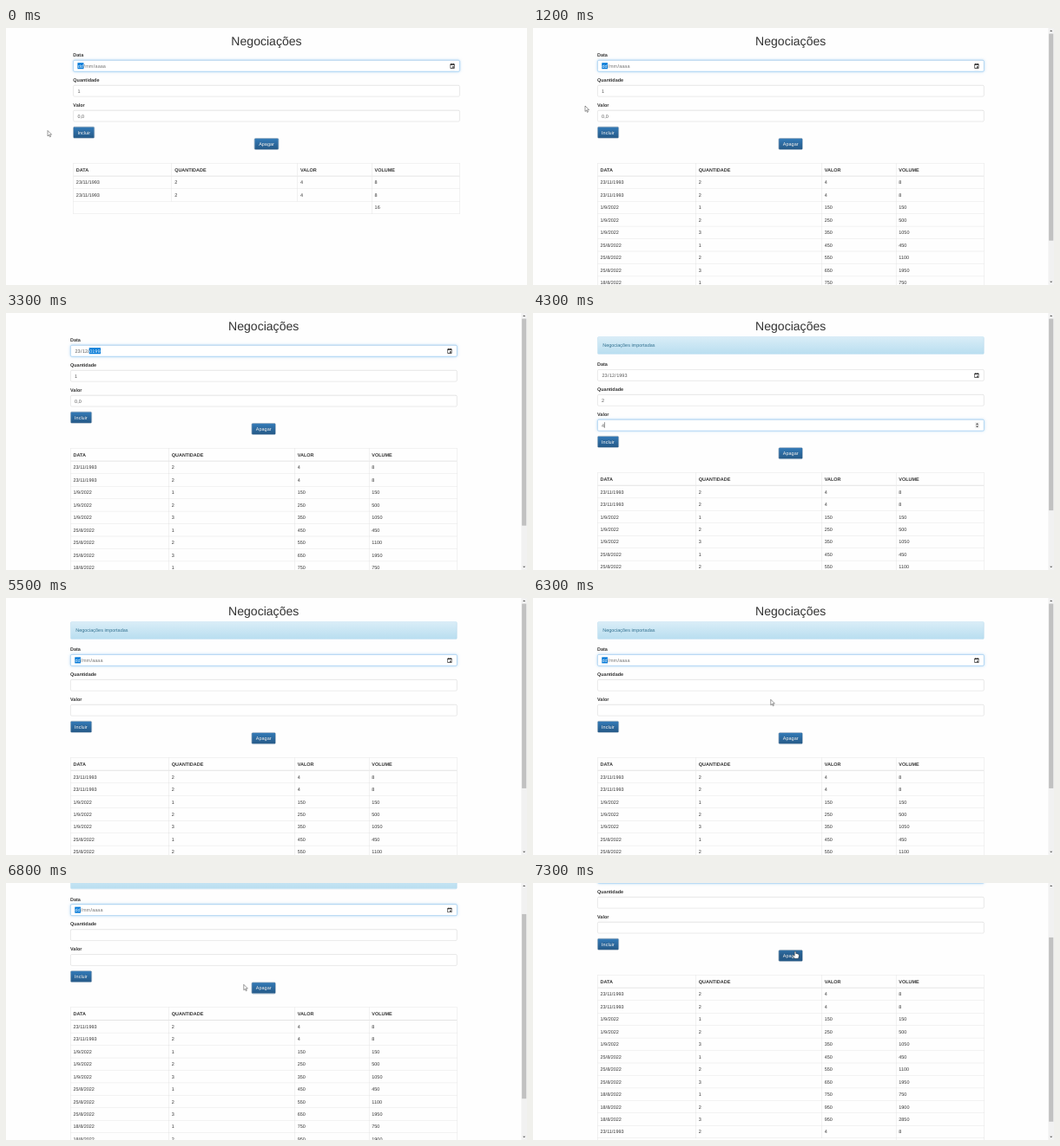
Recreate the animation shown at these times as an HTML page. Size 600 by 297 pixels, loop 7.4 s.

```html
<!DOCTYPE html>
<html lang="pt-BR">
<head>
<meta charset="utf-8">
<title>Negociações</title>
<style>
* { box-sizing: border-box; }
html, body { margin: 0; width: 600px; height: 297px; overflow: hidden; background: #fefefe; }
#stage {
  position: absolute; left: 0; top: 0; width: 1536px; height: 760.32px; overflow: hidden;
  transform: scale(.390625); transform-origin: 0 0; text-rendering: geometricPrecision;
  font: 14px/20px "Liberation Sans", Arial, sans-serif; color: #333;
}
#page { display: flow-root; }
.container { width: 1170px; margin: 0 auto; padding: 0 15px; }
h1 { margin: 20px 0 10px; font-size: 36px; line-height: 39.6px; font-weight: 400; text-align: center; }
.alert {
  height: 52px; margin-bottom: 20px; padding: 15px; border: 1px solid #9acfea; border-radius: 4px;
  color: #31708f; background: linear-gradient(#d9edf7, #b9def0);
  box-shadow: inset 0 1px 0 rgba(255,255,255,.25), 0 1px 2px rgba(0,0,0,.05);
}
.label { height: 20px; margin-bottom: 5px; font-weight: 700; }
.input {
  position: relative; height: 34px; margin-bottom: 15px; padding: 6px 12px; white-space: nowrap;
  border: 1px solid #ccc; border-radius: 4px; background: #fff; color: #555;
  box-shadow: inset 0 1px 1px rgba(0,0,0,.075);
}
.input.focus { border-color: #66afe9; box-shadow: inset 0 1px 1px rgba(0,0,0,.075), 0 0 8px rgba(102,175,233,.6); }
.input svg { position: absolute; }
.part { display: inline-block; line-height: 18px; padding: 0 1px; }
.empty { color: #757575; }
.sel { background: #0078d7; color: #fff; }
.caret { display: inline-block; width: 1px; height: 17px; margin-right: -1px; background: #000; vertical-align: -3px; }
.btn {
  width: max-content; height: 34px; padding: 6px 12px; border: 1px solid #245580; border-radius: 4px;
  color: #fff; text-shadow: 0 -1px 0 rgba(0,0,0,.2); background: linear-gradient(#337ab7, #265a88);
  box-shadow: inset 0 1px 0 rgba(255,255,255,.15), 0 1px 1px rgba(0,0,0,.075);
}
.btn.on { background: linear-gradient(#2d6ca2, #265a88 55%); border-color: #204d74; }
#clear { margin: 0 auto; }
table { width: 1140px; margin: 40px 0 20px; table-layout: fixed; border-collapse: collapse; border: 1px solid #ddd; }
th, td { height: 37px; padding: 8px; border: 1px solid #ddd; text-align: left; }
th { border-bottom-width: 2px; }
#bar { position: absolute; right: 0; top: 0; width: 17px; height: 100%; background: #f1f1f1; }
#thumb { position: absolute; left: 2px; width: 13px; background: #c1c1c1; }
#bar svg { position: absolute; left: 0; fill: #505050; }
#pointer { position: absolute; left: 0; top: 0; overflow: visible; fill: #fff; stroke: #000; stroke-linejoin: round; }
[hidden] { display: none !important; }
</style>
</head>
<body>
<div id="stage">
  <div id="page"><div class="container">
    <h1>Negociações</h1>
    <div class="alert" id="msg">Negociações importadas</div>
    <div class="label">Data</div>
    <div class="input" id="date"><span id="dateText"></span>
      <svg style="right:14px;top:9px" width="14" height="15" viewBox="0 0 14 15">
        <path d="M1 2H13V14H1ZM1 3.5H13M4 0V3M10 0V3" fill="none" stroke="#000" stroke-width="1.8"/>
        <path d="M7.5 8.5H11V12H7.5Z"/>
      </svg>
    </div>
    <div class="label">Quantidade</div>
    <div class="input" id="qty"></div>
    <div class="label">Valor</div>
    <div class="input"><span id="val"></span>
      <svg id="spin" style="right:12px;top:6px" width="15" height="20" viewBox="0 0 15 20">
        <path d="M0 0H15V20H0Z" fill="#efefef"/>
        <path d="M3.5 8L7.5 3.5L11.5 8ZM3.5 12L7.5 16.5L11.5 12Z" fill="#444"/>
      </svg>
    </div>
    <div class="btn" id="add">Incluir</div>
    <div class="btn" id="clear">Apagar</div>
    <table>
      <colgroup><col style="width:290px"><col style="width:371px"><col style="width:219px"><col></colgroup>
      <thead><tr><th>DATA</th><th>QUANTIDADE</th><th>VALOR</th><th>VOLUME</th></tr></thead>
      <tbody id="rows"></tbody>
      <tfoot><tr><td colspan="3"></td><td id="total"></td></tr></tfoot>
    </table>
  </div></div>
  <div id="bar">
    <svg style="top:0" width="17" height="17"><path d="M4.5 10.5L8.5 6.5L12.5 10.5Z"/></svg>
    <div id="thumb"></div>
    <svg style="bottom:0" width="17" height="17"><path d="M4.5 6.5L8.5 10.5L12.5 6.5Z"/></svg>
  </div>
  <svg id="pointer" width="1" height="1">
    <path id="arrow" d="M0 0V16.5L3.8 13L6.4 19L9 17.9L6.4 12H11.7Z"/>
    <path id="hand" d="M-2 1.5Q0 -1 2 1.5V7Q4 5.5 5.5 7.5Q7.5 6.5 8.5 8.5Q11 8 11 10.5V15L9 21H-2L-7 14Q-8 10.5 -5 11L-2 14Z"/>
  </svg>
</div>
<script>
const LOOP = 7400, STEP = 100, SCALE = .390625, VIEW = 760.32, ARROW = 17;
const $ = id => document.getElementById(id);

const deals = [
  ['23/11/1993', 2, 4], ['23/11/1993', 2, 4],
  ['1/9/2022', 1, 150], ['1/9/2022', 2, 250], ['1/9/2022', 3, 350],
  ['25/8/2022', 1, 450], ['25/8/2022', 2, 550], ['25/8/2022', 3, 650],
  ['18/8/2022', 1, 750], ['18/8/2022', 2, 950], ['18/8/2022', 3, 950],
  ['23/11/1993', 2, 4]
];
const rows = deals.map(([day, n, price]) => {
  const tr = $('rows').insertRow();
  [day, n, price, n * price].forEach(v => tr.insertCell().textContent = v);
  return tr;
});

// Event times in ms
const IMPORT = 1200, TYPE = 2000, TO_QTY = 3700, TO_VAL = 4000, NOTICE = 4200, TO_ADD = 4500, SUBMIT = 5000;

const dayKeys = [[0, 'dd'], [TYPE, '02'], [2200, '23'], [SUBMIT, 'dd']];
const monthKeys = [[0, 'mm'], [2400, '01'], [2600, '12'], [SUBMIT, 'mm']];
const yearKeys = [[0, 'aaaa'], [2900, '0001'], [3100, '0019'], [3300, '0199'], [3500, '1993'], [SUBMIT, 'aaaa']];
const partKeys = [[0, 0], [2200, 1], [2600, 2], [TO_QTY, -1], [SUBMIT, 0]];
const focusKeys = [[0, 'date'], [TO_QTY, 'qty'], [TO_VAL, 'val'], [TO_ADD, 'add'], [SUBMIT, 'date']];
const qtyKeys = [[0, '1'], [3900, '2'], [SUBMIT, '']];
const valKeys = [[0, '0,0'], [4200, '4'], [SUBMIT, '']];
const path = [
  [100, 48, 118.5], [400, 60, 90], [5700, 130, 100], [6300, 273.8, 117.3],
  [6900, 273.8, 117.3], [7300, 302, 79]
];

const at = (keys, t) => keys.filter(k => k[0] <= t).pop()[1];
const ease = (t, a, b) => {
  const u = Math.min(1, Math.max(0, (t - a) / (b - a)));
  return u * u * (3 - 2 * u);
};

function pointerAt(t) {
  const i = path.findIndex(p => p[0] > t);
  if (i === 0) return path[0].slice(1);
  if (i < 0) return path[path.length - 1].slice(1);
  const [a, x, y] = path[i - 1], [b, x2, y2] = path[i];
  if (a === 400) return [x, y];
  const u = ease(t, a, b);
  return [x + (x2 - x) * u, y + (y2 - y) * u];
}

function dateHtml(t) {
  const active = at(partKeys, t);
  return [dayKeys, monthKeys, yearKeys].map((keys, i) => {
    const text = at(keys, t);
    const look = i === active ? ' sel' : /\d/.test(text) ? '' : ' empty';
    return `<span class="part${look}">${text}</span>`;
  }).join('/');
}

function fieldHtml(text, focused, typed) {
  if (!focused) return text;
  return typed ? text + '<i class="caret"></i>' : `<span class="sel">${text}</span>`;
}

function draw(t) {
  const imported = t >= IMPORT, notice = t >= NOTICE;
  const count = t >= SUBMIT ? 12 : imported ? 11 : 2;
  const focus = at(focusKeys, t);

  rows.forEach((tr, i) => tr.hidden = i >= count);
  $('total').textContent = deals.slice(0, count).reduce((sum, d) => sum + d[1] * d[2], 0);
  $('msg').hidden = !notice;

  $('dateText').innerHTML = dateHtml(t);
  $('qty').innerHTML = fieldHtml(at(qtyKeys, t), focus === 'qty', t >= 3900);
  $('val').innerHTML = fieldHtml(at(valKeys, t), focus === 'val', t >= 4200);
  $('date').classList.toggle('focus', focus === 'date');
  $('qty').classList.toggle('focus', focus === 'qty');
  $('val').parentNode.classList.toggle('focus', focus === 'val');
  $('spin').style.display = focus === 'val' ? '' : 'none';
  $('add').classList.toggle('on', focus === 'add');

  const scroll = 100 * (ease(t, 6310, 6720) + ease(t, 6750, 7150));
  const height = 495.6 + 37 * (count - 2 + 2) + (notice ? 72 : 0);
  const track = VIEW - 2 * ARROW;
  $('page').style.width = (imported ? 1519 : 1536) + 'px';
  $('page').style.transform = `translateY(${-scroll}px)`;
  $('bar').hidden = !imported;
  $('thumb').style.top = ARROW + track * scroll / height + 'px';
  $('thumb').style.height = track * VIEW / height + 'px';

  const [x, y] = pointerAt(t);
  const hover = t > 7000 && x > 283 && y < 90;
  $('clear').classList.toggle('on', hover);
  $('pointer').style.transform = `translate(${x / SCALE}px, ${y / SCALE}px)`;
  $('pointer').style.display = t >= TYPE && t < 5700 ? 'none' : '';
  $('arrow').style.display = hover ? 'none' : '';
  $('hand').style.display = hover ? '' : 'none';
}

let start = null, last = -1;
function tick(now) {
  if (start === null) start = now;
  const t = Math.floor((now - start) % LOOP / STEP) * STEP;
  if (t !== last) draw(last = t);
  requestAnimationFrame(tick);
}
draw(0);
requestAnimationFrame(tick);
</script>
</body>
</html>
```
